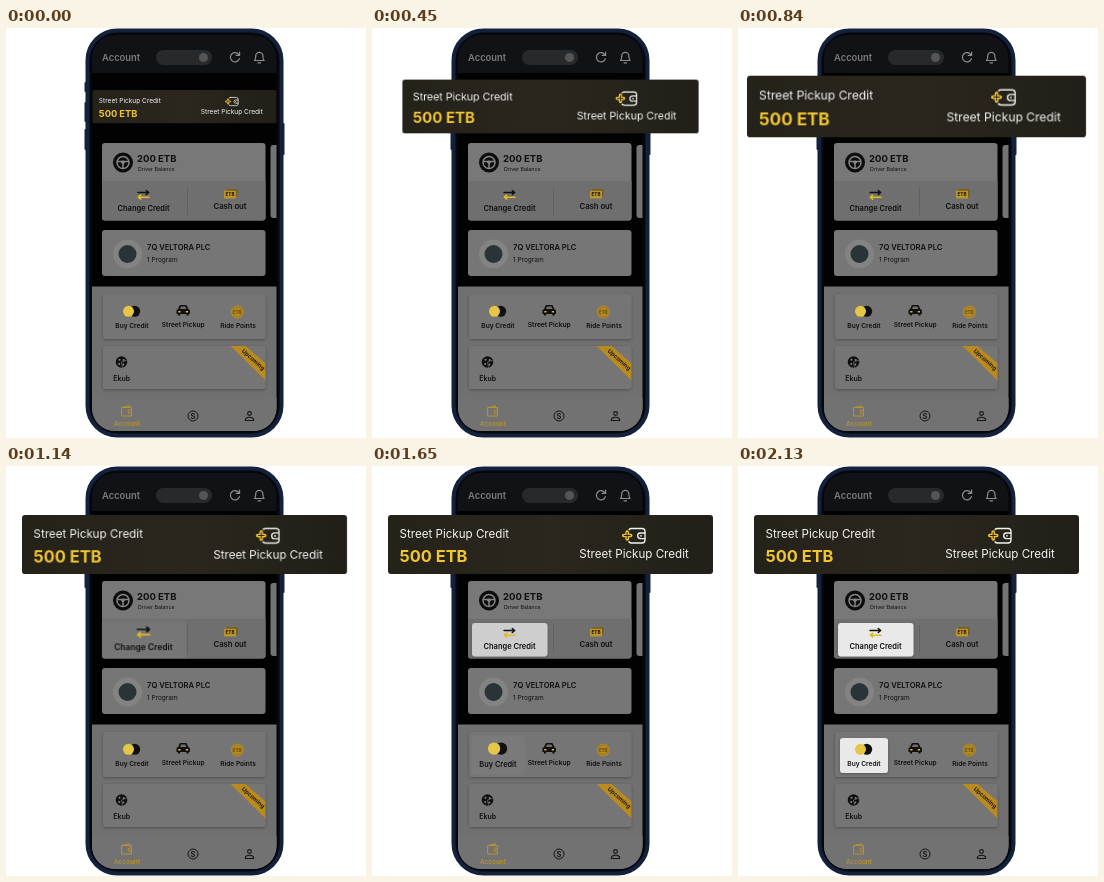
An HTML page for the animation above (2.16 s loop, 360 px wide and 410 px high).

```html
<!DOCTYPE html>
<html lang="en">
<head>
<meta charset="utf-8">
<title>Account credit</title>
<style>
  html, body { margin: 0; width: 100%; height: 100%; overflow: hidden; background: #fff; }
  svg { display: block; width: 360px; height: 410px; }
  text { font-family: Inter, Roboto, sans-serif; fill: #101010; }
  .semi { font-weight: 600; }
  .bold { font-weight: 700; }
  .mid { text-anchor: middle; }
  .line { fill: none; stroke-linecap: round; stroke-linejoin: round; }

  .banner, .tile, .glow { animation: 2160ms linear infinite; }
  .banner { transform-origin: 178.5px 78.5px; animation-name: zoom; }
  .change { transform-origin: 137.5px 173.5px; animation-name: settle-change; }
  .buy { transform-origin: 126px 289.5px; animation-name: settle-buy; }
  .change .glow { animation-name: light-change; }
  .buy .glow { animation-name: light-buy; }

  @keyframes zoom {
    0% { transform: scale(.566); }
    5.56% { transform: scale(.69); }
    12.5% { transform: scale(.8215); }
    18.5% { transform: scale(.892); }
    25% { transform: scale(.945); }
    29.17% { transform: scale(.975); }
    38.89% { transform: scale(1.043); }
    41.67% { transform: scale(1.052); }
    45.83% { transform: scale(1.046); }
    50% { transform: scale(1.026); }
    52.78%, 100% { transform: scale(1); }
  }
  @keyframes settle-change {
    0%, 51.38% { transform: scale(1); }
    51.39% { transform: scale(1.14); animation-timing-function: ease-out; }
    73.6%, 100% { transform: scale(1); }
  }
  @keyframes light-change {
    0%, 51.38% { opacity: 0; }
    51.39% { opacity: .02; }
    76.39% { opacity: .66; }
    84%, 100% { opacity: .85; }
  }
  @keyframes settle-buy {
    0%, 76.37% { transform: scale(1); }
    76.38% { transform: scale(1.12); animation-timing-function: ease-out; }
    97%, 100% { transform: scale(1); }
  }
  @keyframes light-buy {
    0%, 76.37% { opacity: 0; }
    76.38% { opacity: .04; }
    98.6%, 100% { opacity: .85; }
  }
</style>
</head>
<body>
<svg viewBox="0 0 360 410">
  <defs>
    <clipPath id="screen"><rect x="86" y="7" width="184.5" height="396" rx="23"/></clipPath>
    <clipPath id="ekub"><rect x="97" y="318" width="162.5" height="43" rx="3"/></clipPath>
    <linearGradient id="bar">
      <stop offset="0" stop-color="#25221a"/>
      <stop offset=".5" stop-color="#2b271e"/>
      <stop offset="1" stop-color="#211f18"/>
    </linearGradient>
    <filter id="soft" x="-20%" y="-20%" width="140%" height="150%">
      <feDropShadow dx="0" dy="1" stdDeviation="1.5" flood-opacity=".3"/>
    </filter>
  </defs>

  <!-- phone body -->
  <g fill="#14213c">
    <rect x="78.5" y="54" width="3" height="10" rx="1"/>
    <rect x="78.5" y="74" width="3" height="20" rx="1"/>
    <rect x="78.5" y="101" width="3" height="21" rx="1"/>
    <rect x="275.5" y="95" width="3" height="32" rx="1"/>
  </g>
  <rect x="81.5" y="2.5" width="194" height="405" rx="30" fill="#05070c" stroke="#14213c" stroke-width="4"/>

  <g clip-path="url(#screen)">
    <rect x="86" y="7" width="185" height="396" fill="#020202"/>
    <rect x="86" y="7" width="185" height="38" fill="#111215"/>

    <!-- header -->
    <text class="semi" x="96" y="33" font-size="9.4" style="fill:#7c7c7c">Account</text>
    <rect x="150" y="22" width="56" height="15" rx="7.5" fill="#28292b"/>
    <circle cx="197.5" cy="29.5" r="4.5" fill="#555"/>
    <g class="line" stroke="#8c8c8c" stroke-width="1.2">
      <path d="M233 27a4.6 4.6 0 1 0 .4 3.6M233.6 24v3.4h-3.4"/>
      <path d="M248.5 32.5c1.4-1.4 1.2-3 1.2-4.6a3.6 3.6 0 0 1 7.2 0c0 1.6-.2 3.2 1.2 4.6zM252 34.8h2.6"/>
    </g>

    <!-- balance card -->
    <rect x="264.5" y="117" width="20" height="73" rx="3" fill="#747474"/>
    <rect x="96" y="115" width="163.5" height="77.5" rx="3" fill="#787878"/>
    <path d="M96 153h163.5v36.5a3 3 0 0 1-3 3H99a3 3 0 0 1-3-3z" fill="#6f6f6f"/>
    <path d="M181.5 159v28" stroke="#5c5c5c" stroke-width=".7"/>
    <circle cx="117" cy="134.5" r="10" fill="#0c0c0c"/>
    <g class="line" stroke="#858585" stroke-width="1.5">
      <circle cx="117" cy="134.5" r="6"/>
      <path d="M111.5 133.5h11M117 135v5"/>
    </g>
    <circle cx="117" cy="134.3" r="1.8" fill="#858585"/>
    <text class="bold" x="131" y="134" font-size="9.5">200 ETB</text>
    <text x="132" y="143" font-size="5.3">Driver Balance</text>

    <rect x="220" y="161.2" width="11.5" height="7.5" rx=".8" fill="#7a5c17"/>
    <rect x="218" y="162.8" width="12" height="7.7" rx=".8" fill="#bd942a"/>
    <text class="bold mid" x="224" y="168.4" font-size="4.6">ETB</text>
    <text class="semi mid" x="224" y="181" font-size="7.7">Cash out</text>

    <g class="tile change">
      <rect class="glow" x="100" y="157" width="75.5" height="33.5" rx="3" fill="#fff" filter="url(#soft)"/>
      <g class="line" stroke-width="1.5">
        <path d="M132 164.5h10.5M140.3 162.5l2.4 2-2.4 2" stroke="#101010"/>
        <path d="M143 169.2h-10.5M134.7 167.2l-2.4 2 2.4 2" stroke="#dfba2b"/>
      </g>
      <text class="semi mid" x="137.5" y="183" font-size="7.5">Change Credit</text>
    </g>

    <!-- program card -->
    <rect x="96" y="202" width="163.5" height="46" rx="3" fill="#767676"/>
    <circle cx="121.5" cy="226" r="14.5" fill="#838383"/>
    <circle cx="121.5" cy="226" r="9" fill="#2a3437"/>
    <text class="semi" x="141" y="222" font-size="7.6">7Q VELTORA PLC</text>
    <text x="141" y="234" font-size="6.5">1 Program</text>

    <!-- services -->
    <rect x="86" y="258.5" width="185" height="145" fill="#707070"/>
    <g fill="#747474" filter="url(#soft)">
      <rect x="97" y="266" width="162.5" height="45" rx="3"/>
      <rect x="97" y="318" width="162.5" height="43" rx="3"/>
    </g>

    <path d="M170.5 282l1.4-.8 1.5-3.3q.3-.9 1.2-.9h5.2q.9 0 1.2.9l1.5 3.3 1.4.8v4h-1.3v1.5h-2.2v-1.5h-6.3v1.5h-2.2v-1.5h-1.4z" fill="#101010"/>
    <path d="M174 281l1-2.5h4.4l1 2.5z" fill="#6e6e6e"/>
    <path d="M172.3 283.8h2.2M179.8 283.8h2.2" stroke="#dfba2b" stroke-width="1.4"/>
    <text class="semi mid" x="177.2" y="299" font-size="6.65">Street Pickup</text>

    <circle cx="231.3" cy="284" r="6.5" fill="#b48a25"/>
    <circle cx="231.3" cy="284" r="4.9" fill="none" stroke="#8a6816" stroke-width=".6"/>
    <text class="bold mid" x="231.3" y="285.5" font-size="4.2" style="fill:#5d450f">ETB</text>
    <text class="semi mid" x="232" y="300" font-size="6.6">Ride Points</text>

    <g class="tile buy">
      <rect class="glow" x="102" y="272" width="48" height="35" rx="3" fill="#fff" filter="url(#soft)"/>
      <circle cx="128.7" cy="283.3" r="5.5" fill="#101010"/>
      <circle cx="122.5" cy="283.3" r="5.5" fill="#e6c645"/>
      <text class="semi mid" x="126" y="300" font-size="6.6">Buy Credit</text>
    </g>

    <circle cx="115.5" cy="334" r="5.8" fill="#101010"/>
    <g fill="#858585">
      <circle cx="113.5" cy="331.7" r="1"/>
      <circle cx="117.7" cy="332" r="1"/>
      <circle cx="113.2" cy="336" r="1"/>
      <circle cx="117.3" cy="336.6" r="1"/>
    </g>
    <path d="M115.5 334l5.8-2M115.5 334l1 5.5" stroke="#747474" stroke-width=".7"/>
    <text class="semi" x="107.3" y="353" font-size="7">Ekub</text>
    <g clip-path="url(#ekub)">
      <path d="M224.5 318h15l20 17.5v17z" fill="#b98a1f"/>
      <text class="semi mid" transform="translate(246 333) rotate(42)" font-size="5.8">Upcoming</text>
    </g>

    <!-- navigation -->
    <rect x="86" y="370" width="185" height="34" fill="#727272"/>
    <g class="line" stroke="#b8922c">
      <path d="M116 379.5h9.5v8.5h-9.500zM116 379.5l7.5-1.7v1.7M125.500 382.2h-3.2v3h3.2"/>
    </g>
    <text class="semi mid" x="121" y="397.500" font-size="6.400" style="fill:#b8922c">Account</text>
    <circle cx="187" cy="388" r="5" fill="none" stroke="#151515"/>
    <text class="semi mid" x="187" y="390.700" font-size="7.500">S</text>
    <g class="line" stroke="#151515" stroke-width="1.1">
      <circle cx="243.5" cy="385.5" r="1.9"/>
      <path d="M239.3 392.5q0-3.2 4.2-3.2t4.2 3.2z"/>
    </g>
  </g>

  <!-- credit banner -->
  <g class="banner">
    <rect x="16" y="49" width="325" height="59" rx="3" fill="url(#bar)"/>
    <text x="27.5" y="71.5" font-size="11.6" style="fill:#f4f4f2">Street Pickup Credit</text>
    <text class="bold" x="27.5" y="96.3" font-size="16.4" style="fill:#f0c530">500 ETB</text>
    <g class="line" stroke="#f4f4f2" stroke-width="1.3">
      <rect x="256.5" y="62.5" width="16.5" height="14.5" rx="3"/>
      <path d="M273 67h-4.500a2.800 2.800 0 0 0 0 5.600h4.500"/>
    </g>
    <circle cx="269" cy="69.800" r=".9" fill="#f4f4f2"/>
    <g class="line">
      <path d="M255.200 66v7M251.700 69.500h7" stroke="#26231b" stroke-width="5.500"/>
      <path d="M255.200 66v7M251.700 69.500h7" stroke="#f0c530" stroke-width="3.600"/>
      <path d="M255.200 66.500v6M252.200 69.500h6" stroke="#26231b" stroke-width="1"/>
    </g>
    <text class="mid" x="262" y="92.300" font-size="11.600" style="fill:#f4f4f2">Street Pickup Credit</text>
  </g>
</svg>
</body>
</html>
```
